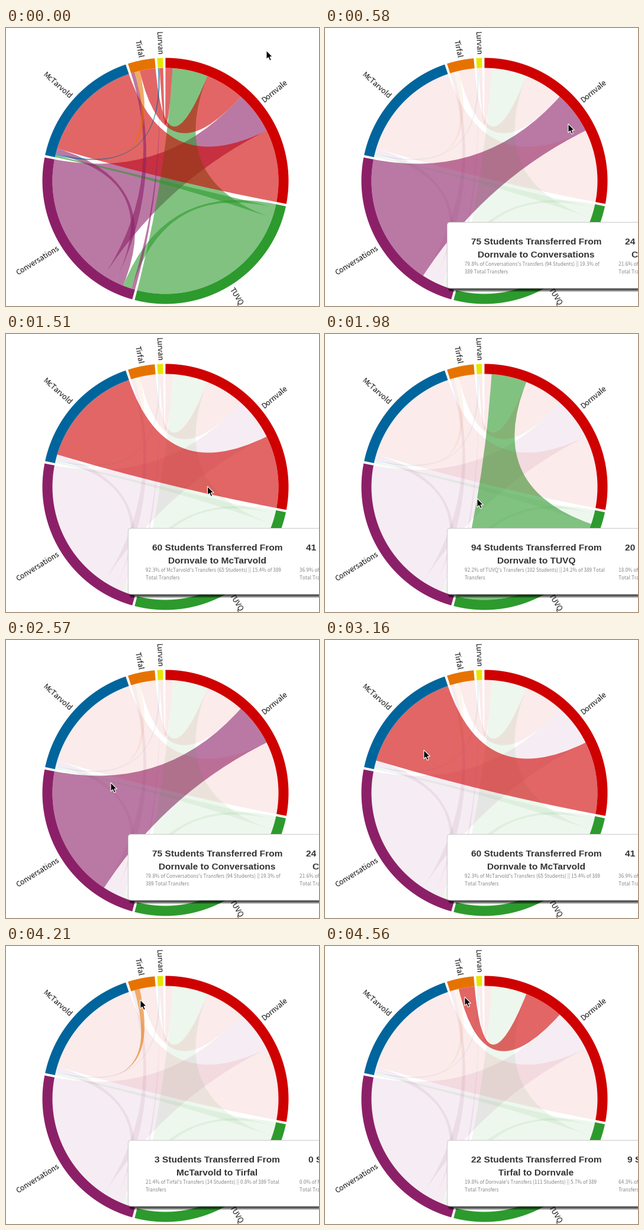
Animation, 529 px wide and 470 px high, one loop 4790 ms. Source, as a matplotlib script:

```python
import numpy as np
import matplotlib.pyplot as plt
from matplotlib.animation import FuncAnimation
from matplotlib.patches import FancyBboxPatch, PathPatch, Polygon
from matplotlib.path import Path

W, H, DPI = 529, 470, 64
LOOP_MS = 4790
STEPS, SUB = 41, 5  # pointer steps in a loop, drawn frames per step
CX, CY, R_IN, R_OUT = 269.5, 258.5, 191, 208
PAD = 0.02
SOLID, FAINT = 0.6, 0.08
LABEL_FONT, HEAD_FONT = "Noto Sans CJK JP", "Liberation Sans"

# group key: (name, colour), clockwise from the top
GROUPS = {
    "W": ("Dornvale", "#cf0000"),
    "S": ("TUVQ", "#2d9a2d"),
    "C": ("Conversations", "#8c2068"),
    "M": ("McTarvold", "#00659c"),
    "L": ("Tirfal", "#e67300"),
    "B": ("Lurvan", "#e6e600"),
}
# (to, from, count, count the other way, colour owner), bottom to top
CHORDS = [
    ("C", "W", 75, 24, "C"),
    ("S", "W", 94, 20, "S"),
    ("M", "W", 60, 41, "W"),
    ("W", "L", 22, 9, "W"),
    ("W", "B", 4, 2, "W"),
    ("C", "S", 5, 2, "S"),
    ("S", "M", 6, 1, "S"),
    ("C", "M", 5, 3, "C"),
    ("C", "L", 7, 2, "C"),
    ("C", "B", 2, 0, "C"),
    ("L", "M", 3, 0, "L"),
    ("M", "B", 1, 1, "M"),
]
# (first step, hovered pair)
HOVERS = [(0, None), (4, "CW"), (7, "MW"), (14, "SW"), (18, "CW"),
          (23, "MW"), (31, "CL"), (34, "LM"), (38, "WL")]
# (step, x, y) of the pointer tip
POINTER = np.array([
    (0, 440, 38), (1, 437, 54), (3, 424, 106), (5, 411, 162), (7, 395, 202),
    (9, 388, 221), (10, 386, 225), (12, 361, 246), (14, 320, 269),
    (17, 257, 278), (19, 222, 264), (22, 177, 241), (23, 169, 222),
    (24, 164, 209), (25, 164, 209), (27, 167, 186), (30, 212, 112),
    (32, 217, 94), (33, 217, 94), (36, 227, 91), (37, 227, 91),
    (39, 236, 86), (40, 236, 86)])


def pt(px):
    return px * 72 / DPI


def polar(a, r):
    a = np.asarray(a)
    return np.column_stack((CX + r * np.sin(a), CY - r * np.cos(a)))


def arc(a0, a1, r):
    return polar(np.linspace(a0, a1, 60), r)


def ribbon(s, t):
    """Closed band between two arcs, bent towards the centre."""
    a, b = arc(*s, R_IN), arc(*t, R_IN)
    mid = [(CX, CY)]
    verts = np.vstack((a, mid, b, mid, a[:1]))
    curve = [Path.CURVE3] * 2
    line = [Path.LINETO] * (len(a) - 1)
    return Path(verts, [Path.MOVETO] + line + curve + line + curve)


def layout():
    """Angles of every group and of every chord end."""
    ends = {g: [] for g in GROUPS}
    for to, frm, n, back, _ in CHORDS:
        ends[to].append((n, frm))
        ends[frm].append((back, to))
    totals = {g: sum(n for n, _ in e) for g, e in ends.items()}
    unit = (2 * np.pi - PAD * len(GROUPS)) / sum(totals.values())
    spans, parts, a = {}, {}, 0
    for g in GROUPS:
        start = a
        for n, other in sorted(ends[g], key=lambda e: e[0]):
            parts[g, other] = (a, a + n * unit)
            a += n * unit
        spans[g] = (start, a)
        a += PAD
    return totals, spans, parts


def wrap(text, width=62):
    lines = [""]
    for word in text.split():
        if len(lines[-1]) + len(word) + 1 > width:
            lines.append("")
        lines[-1] = (lines[-1] + " " + word).strip()
    return lines


def flow_text(to, frm, n):
    a, b = GROUPS[to][0], GROUPS[frm][0]
    total, everyone = totals[to], sum(totals.values())
    head = [f"{n} Students Transferred From", f"{b} to {a}"]
    note = (f"{100 * n / total:.1f}% of {a}'s Transfers ({total} Students) "
            f"|| {100 * n / everyone:.1f}% of {everyone} Total Transfers")
    return head + wrap(note)


totals, spans, parts = layout()

fig = plt.figure(figsize=(W / DPI, H / DPI), dpi=DPI, facecolor="white")
ax = fig.add_axes([0, 0, 1, 1])
ax.set_xlim(0, W)
ax.set_ylim(H, 0)
ax.axis("off")

bands = {}
for to, frm, n, back, owner in CHORDS:
    path = ribbon(parts[to, frm], parts[frm, to])
    bands[to + frm] = ax.add_patch(
        PathPatch(path, fc=GROUPS[owner][1], lw=0, alpha=SOLID, zorder=1))


def add_group(key, size=12.4):
    name, colour = GROUPS[key]
    a0, a1 = spans[key]
    ring = np.vstack((arc(a0, a1, R_OUT), arc(a1, a0, R_IN)))
    ax.add_patch(Polygon(ring, fc=colour, lw=0, zorder=2))
    mid = (a0 + a1) / 2
    flip = mid > np.pi
    x, y = polar([mid], R_OUT + 5)[0]
    # lower the baseline so the text is centred on its spoke
    drop = 0.35 * size * (-1 if flip else 1)
    ax.text(x + drop * np.cos(mid), y + drop * np.sin(mid), name,
            family=LABEL_FONT, size=pt(size), color="#111111",
            rotation=90 - np.degrees(mid) + 180 * flip,
            rotation_mode="anchor", ha="right" if flip else "left",
            va="baseline", zorder=3)


for key in GROUPS:
    add_group(key)


def rounded(x, y, bottom, **style):
    return ax.add_patch(FancyBboxPatch(
        (x, y), 700 - x, bottom - y,
        boxstyle="round,pad=0,rounding_size=5", **style))


tip = [rounded(208 + i * 0.4, 334, 446 - i, fc="black", lw=0, alpha=0.22,
               zorder=4) for i in range(6)]
tip.append(rounded(206.5, 328.5, 440, fc="white", ec="#c8c8c8", lw=pt(1),
                   zorder=5))


def tip_column(centre, left):
    head = dict(family=HEAD_FONT, weight="bold", size=pt(15.45),
                color="#333333", ha="center", zorder=6)
    note = dict(family=LABEL_FONT, size=pt(8.2), color="#8c8c8c", zorder=6)
    return ([ax.text(centre, y, "", **head) for y in (366, 388)]
            + [ax.text(left, y, "", **note) for y in (402, 415)])


columns = [tip_column(357, 236), tip_column(617, 496)]
tip += columns[0] + columns[1]

ARROW = np.array([(0, 0), (0, 15), (3.4, 11.8), (5.8, 17.2), (8.4, 16.1),
                  (6.1, 10.8), (10.6, 10.8)])
pointer = ax.add_patch(Polygon(ARROW, fc="black", ec="white", lw=pt(1.1),
                               joinstyle="miter", zorder=10))


def draw(frame):
    # each step begins one drawn frame early, as the steps are not quite even
    step = min((frame + 1) // SUB, STEPS - 1)
    hover = [pair for start, pair in HOVERS if start <= step][-1]
    for pair, band in bands.items():
        band.set_alpha(SOLID if hover in (None, pair) else FAINT)
    for artist in tip:
        artist.set_visible(hover is not None)
    if hover:
        to, frm, n, back, _ = next(c for c in CHORDS if c[0] + c[1] == hover)
        texts = flow_text(to, frm, n), flow_text(frm, to, back)
        for column, lines in zip(columns, texts):
            for label, line in zip(column, lines):
                label.set_text(line)
    xy = [np.interp(step, POINTER[:, 0], POINTER[:, k]) for k in (1, 2)]
    pointer.set_xy(ARROW + xy)
    return [*bands.values(), *tip, pointer]


anim = FuncAnimation(fig, draw, frames=STEPS * SUB,
                     interval=LOOP_MS / (STEPS * SUB),
                     init_func=lambda: draw(0), repeat=True, repeat_delay=0)
plt.show()
```
